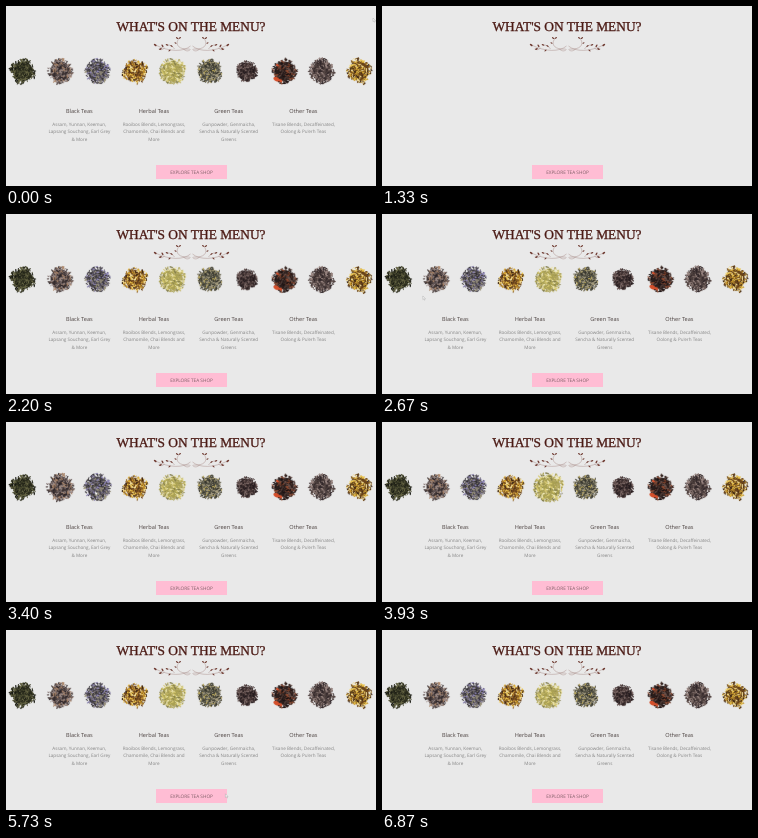
These frames come from a looping animation (370 by 180 pixels, 6.99 s). An HTML page with a canvas:

```html
<!DOCTYPE html>
<html lang="en">
<head>
<meta charset="utf-8">
<title>What's on the menu?</title>
<style>
  html, body { margin: 0; height: 100%; overflow: hidden; background: #e9e9e9; }
  canvas { display: block; width: 370px; height: 180px; }
</style>
</head>
<body>
<canvas id="stage"></canvas>
<script>
const LOOP = 6990, CLEAR = 1330, REVEAL = 1500;
const FIRST_HOVER = 2850, HOVER_STEP = 215;
const SPRITE = 36, DETAIL = 4;

const canvas = document.getElementById('stage');
const dpr = window.devicePixelRatio || 1;
canvas.width = 370 * dpr;
canvas.height = 180 * dpr;
const ctx = canvas.getContext('2d');
ctx.scale(dpr, dpr);
ctx.imageSmoothingQuality = 'high';

const clamp = v => Math.max(0, Math.min(1, v));
const smooth = v => { v = clamp(v); return v * v * (3 - 2 * v); };
const easeOut = v => 1 - (1 - clamp(v)) ** 3;

function seeded(seed) {
  return () => {
    seed = (seed * 1664525 + 1013904223) >>> 0;
    return seed / 4294967296;
  };
}

// Heap radius, raggedness of the edge, then leaf colours from most to least common
const teas = [
  [12.6, 0.12, '#2c2d1e', '#47482e', '#666544', '#191a12'],
  [12.6, 0.04, '#433837', '#6d605f', '#2b2428', '#9b8b88', '#a98468'],
  [12.6, 0.04, '#474349', '#706a78', '#2f2c30', '#8c84b4', '#9a937c'],
  [12.2, 0.12, '#6a421c', '#c8921f', '#e9c04a', '#3d2614', '#a87a30', '#f0dc98'],
  [13.4, 0.03, '#a9a052', '#d6c86e', '#eee7b4', '#7d7948', '#b9ad6a'],
  [12.6, 0.04, '#515043', '#787462', '#35342c', '#a59c80', '#bca95a'],
  [10.6, 0.04, '#382b2b', '#574543', '#241b1e', '#7a6764'],
  [12.4, 0.06, '#2a1e1c', '#46332e', '#180f10', '#66504a', '#8f4a30'],
  [12.8, 0.04, '#493c3a', '#6e5d59', '#302629', '#988580'],
  [12.4, 0.12, '#6a441a', '#cd9b2a', '#ebc44c', '#3a2414', '#a47a2a', '#f0dc98']
];

function makeHeap([radius, ragged, ...colours], index) {
  const random = seeded(index * 97 + 11);
  const sprite = document.createElement('canvas');
  sprite.width = sprite.height = SPRITE * DETAIL;
  const g = sprite.getContext('2d');
  g.scale(DETAIL, DETAIL);
  g.translate(SPRITE / 2, SPRITE / 2);
  g.fillStyle = colours[0];
  g.beginPath();
  g.arc(0, 0, radius * 0.78, 0, 7);
  g.fill();
  g.lineCap = 'round';
  for (let i = 0; i < 300; i++) {
    const angle = random() * Math.PI * 2;
    const edge = 0.97 + ragged * Math.sin(angle * 4 + index);
    const r = Math.sqrt(random()) * radius * edge;
    const x = Math.cos(angle) * r, y = Math.sin(angle) * r;
    const turn = random() * Math.PI, length = 0.3 + random() * 0.9;
    const dx = Math.cos(turn) * length, dy = Math.sin(turn) * length;
    g.strokeStyle = colours[Math.floor(random() * colours.length)];
    g.lineWidth = 0.6 + random() * 0.7;
    g.beginPath();
    g.moveTo(x - dx, y - dy);
    g.lineTo(x + dx, y + dy);
    g.stroke();
  }
  if (index === 7) {
    for (const [x, y, r] of [[-8, 8, 3.2], [-4, 9.5, 2], [-7, -6, 1.6]]) {
      g.fillStyle = '#d4502c';
      g.beginPath();
      g.ellipse(x, y, r, r * 0.65, 0.5, 0, 7);
      g.fill();
    }
  }
  return sprite;
}
const heaps = teas.map(makeHeap);

const columns = [
  ['Black Teas', 'Assam, Yunnan, Keemun,', 'Lapsang Souchong, Earl Grey', '& More'],
  ['Herbal Teas', 'Rooibos Blends, Lemongrass,', 'Chamomile, Chai Blends and', 'More'],
  ['Green Teas', 'Gunpowder, Genmaicha,', 'Sencha & Naturally Scented', 'Greens'],
  ['Other Teas', 'Tisane Blends, Decaffeinated,', "Oolong & Pu'erh Teas"]
];

function text(string, x, y, font, colour) {
  ctx.font = font;
  ctx.fillStyle = colour;
  ctx.textAlign = 'center';
  ctx.textBaseline = 'alphabetic';
  ctx.textRendering = 'geometricPrecision';
  ctx.fillText(string, x, y);
}

function leaf(x, y, angle, size) {
  ctx.beginPath();
  ctx.ellipse(x, y, size, size * 0.5, angle, 0, 7);
  ctx.fill();
}

function drawOrnament() {
  ctx.strokeStyle = '#a58a84';
  ctx.fillStyle = '#6e3a30';
  ctx.lineWidth = 0.45;
  for (const side of [-1, 1]) {
    ctx.save();
    ctx.translate(185.5, 0);
    ctx.scale(side, 1);
    ctx.stroke(new Path2D('M1 40C8 46 22 46 36 39M2 43C12 44 17 39 13 33' +
      'M17 43C19 40 21 39 24 39M8 43C5 46 2 45 1 43M27 42C29 44 31 44 33 43'));
    leaf(11.8, 32, 0.5, 1.4);
    leaf(14.5, 32, -0.7, 1.3);
    leaf(16, 37, -0.5, 1.1);
    leaf(20, 40, -0.6, 1.3);
    leaf(24.5, 38.8, -0.3, 1.4);
    leaf(22, 44.5, 0.6, 1.2);
    leaf(29, 39.8, -1, 1.5);
    leaf(31, 43, 0.4, 1.4);
    leaf(36.3, 39, -0.6, 1.6);
    ctx.restore();
  }
}

// Time, x, y
const path = [
  [2270, 115, 147], [2670, 41, 82], [2880, 2, 70], [4960, 350, 67],
  [5130, 345, 136], [5800, 205, 167], [6330, 205, 167], [6870, 330, 169]
];

function drawCursor(t) {
  let x, y;
  if (t < 270) {
    x = 367 + 4 * clamp((t - 200) / 70);
    y = 12;
  } else {
    const next = path.findIndex(key => key[0] > t);
    if (next < 1) return;
    const [t0, x0, y0] = path[next - 1], [t1, x1, y1] = path[next];
    const p = (t - t0) / (t1 - t0);
    x = x0 + (x1 - x0) * p;
    y = y0 + (y1 - y0) * p;
  }
  ctx.save();
  ctx.translate(x, y);
  const arrow = new Path2D('M0 0V3.6L.9 2.9 1.6 4.3 2.2 4 1.6 2.7H2.6Z');
  ctx.fillStyle = '#fafafa';
  ctx.strokeStyle = '#a0a0a0';
  ctx.lineWidth = 0.4;
  ctx.fill(arrow);
  ctx.stroke(arrow);
  ctx.restore();
}

// Opacity grows evenly while the rise slows down
function reveal(t, delay) {
  const p = t < CLEAR ? 1 : clamp((t - REVEAL - delay) / 700);
  return { alpha: clamp(p * 1.9), drop: 10 * (1 - easeOut(p)) };
}

function hover(t, start, end) {
  return smooth((t - start) / 220) * (1 - smooth((t - end) / 300));
}

function draw(t) {
  ctx.globalAlpha = 1;
  ctx.fillStyle = '#e9e9e9';
  ctx.fillRect(0, 0, 370, 180);
  text("WHAT'S ON THE MENU?", 185, 24.6, '13.4px "Liberation Serif", serif', '#4b1a14');
  ctx.strokeStyle = '#4b1a14';
  ctx.lineWidth = 0.3;
  ctx.strokeText("WHAT'S ON THE MENU?", 185, 24.6);
  drawOrnament();

  heaps.forEach((heap, i) => {
    const { alpha, drop } = reveal(t, i * 35);
    const start = FIRST_HOVER + i * HOVER_STEP;
    const size = SPRITE * (1 + 0.14 * hover(t, start, start + HOVER_STEP));
    ctx.globalAlpha = alpha;
    ctx.drawImage(heap, 17 + i * 37.35 - size / 2, 65.2 + drop - size / 2, size, size);
  });

  columns.forEach(([title, ...lines], i) => {
    const { alpha, drop } = reveal(t, i * 45);
    const x = 73.3 + i * 74.7;
    ctx.globalAlpha = alpha;
    text(title, x, 106.8 + drop, '500 5.6px "Open Sans", sans-serif', '#4c4240');
    lines.forEach((line, row) =>
      text(line, x, 119.8 + row * 7.6 + drop, '4.6px "Open Sans", sans-serif', '#858585'));
  });

  ctx.globalAlpha = 1;
  ctx.fillStyle = '#ffbdd4';
  ctx.fillRect(150, 159, 71, 14);
  ctx.globalAlpha = hover(t, 5800, 6420);
  ctx.fillStyle = '#fbb0ca';
  ctx.fillRect(150, 159, 71, 14);
  ctx.globalAlpha = 1;
  text('EXPLORE TEA SHOP', 185.5, 167.8, '4.7px "Open Sans", sans-serif', '#7d5d65');
  drawCursor(t);
}

function tick() {
  draw(performance.now() % LOOP);
  requestAnimationFrame(tick);
}
tick();
</script>
</body>
</html>
```
